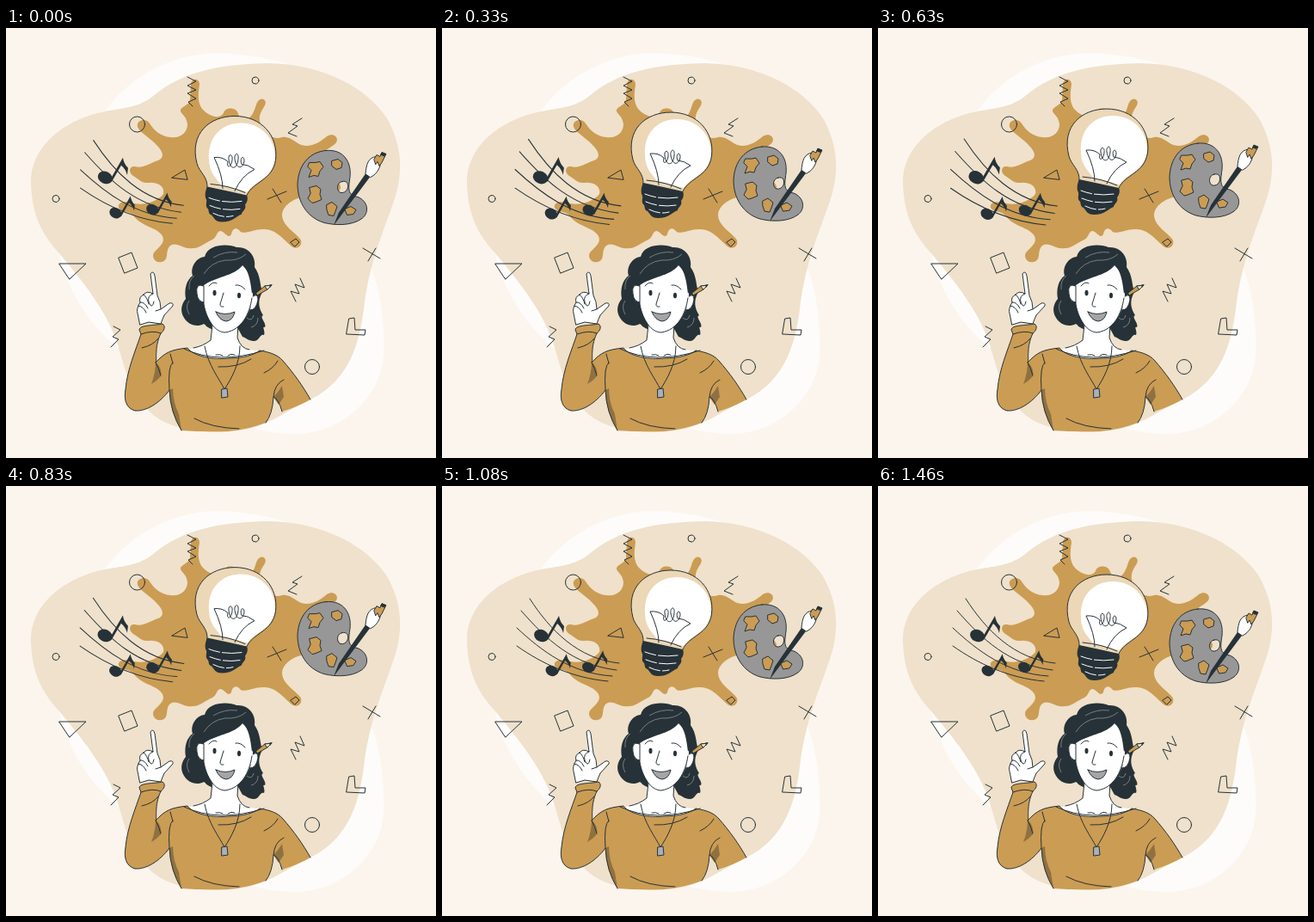
An HTML page that plays this animation: 500x500 px, repeating every 1500 ms.

```html
<!DOCTYPE html>
<html lang="en">
<head>
<meta charset="utf-8">
<title>Creative idea</title>
<style>
  html, body { margin: 0; width: 100%; height: 100%; overflow: hidden; background: #fcf5ed; }
  svg { display: block; width: 100%; height: 100%; }
  .line { fill: none; stroke: #263238; stroke-width: 1; stroke-linecap: round; stroke-linejoin: round; }
  .edge { stroke: #263238; stroke-width: 1; stroke-linejoin: round; stroke-linecap: round; }
  .gold { fill: #cb9c53; }
  .dark { fill: #263238; }
  .white { fill: #fff; }
  .cream { fill: #efe1cb; }
  .shade { fill: #8f7141; }
  .glint { fill: none; stroke: #9aa0a0; stroke-width: .7; }
</style>
</head>
<body>
<svg viewBox="0 0 500 500">
  <g id="backdrop">
    <path fill="#fdfcfa" d="M115 97C140 60 190 30 245 29C290 30 330 40 370 58L425 280C437 310 440 350 439 380C436 430 390 472 335 472C310 471 295 468 280 463L130 372C95 345 70 300 62 262Z"/>
    <path class="cream" d="M29 180C28 140 65 107 115 97C145 92 155 91 170 80C205 50 250 42 305 41C370 42 420 70 443 105C460 135 462 165 453 195C440 235 425 265 417 318C412 366 400 409 354 432C315 450 300 470 245 470C205 469 180 460 165 444C145 425 138 395 132 375C120 330 85 290 62 262C40 238 30 215 29 180Z"/>
  </g>

  <path class="gold" d="M215 65C216 58 225 58 225 66C223 78 223 87 228 94C237 104 249 106 253 99C254 92 268 91 270 100C273 107 282 108 286 101C291 93 290 88 294 84C298 80 304 84 301 90C296 98 292 104 297 114C302 126 313 130 321 127C332 125 338 137 349 137C359 137 367 131 373 126C382 120 390 130 381 136C373 142 362 146 365 159C369 171 386 175 389 184C390 194 372 196 357 195C338 195 322 205 321 217C321 231 339 239 343 247C345 254 337 259 331 253C320 243 312 233 299 234C286 234 275 242 271 235C267 231 263 234 262 240C258 246 254 236 249 236C244 237 246 244 238 247C229 251 224 258 211 256C202 254 196 248 190 254C185 260 190 270 181 272C173 274 168 265 173 260C180 253 185 249 182 242C177 232 157 231 148 218C143 212 134 215 131 209C129 201 142 201 149 204C162 207 177 201 183 193C185 184 176 179 166 180C157 181 154 175 148 172C142 168 143 160 150 161C159 164 169 156 177 154C186 150 181 142 175 136C168 128 155 121 153 115C151 107 163 104 167 111C173 120 180 126 191 127C203 129 211 121 211 112C210 103 205 101 203 97C202 91 213 91 214 83Z"/>

  <g id="doodles" class="line">
    <circle cx="290" cy="61" r="4"/><circle cx="152.500" cy="112" r="9"/>
    <circle cx="58" cy="198.500" r="4"/><circle cx="356" cy="394" r="8.500"/>
    <path d="M211 57L221 62L211 67L221 72L211 76L221 82L212 86L217 91M344 105L333 112L339 114L328 122L338 126M193 174L208 165L211 176ZM304 199L326 190M310 187L320 203M415 256L435 268M430 256L421 271M62 274H93L74 292ZM131 267L146 261L153 279L138 285ZM342 291L347 302L336 298L341 309L331 306L337 318M125 347L133 351L124 359L131 362L122 371M399 338L405 337L406 351L418 351L417 357L396 356ZM331 249L337 245L341 249L336 254Z"/>
  </g>

  <g id="music">
    <path class="line" d="M102 131C126 168 158 201 206 206M92 145C121 178 152 208 203 214M87 165C116 192 150 218 198 221M87 186C117 207 151 223 193 227"/>
    <g id="note" class="dark">
      <ellipse cx="115.500" cy="174" rx="8.700" ry="7" transform="rotate(25 115.500 174)"/>
      <path d="M121 177L136 151Q137 158 142 163L141 171Q139 164 134 160L123 179Z"/>
    </g>
    <use href="#note" transform="translate(30.500 67) scale(.84 .85)"/>
    <use href="#note" transform="translate(73 63) scale(.84 .85)"/>
  </g>

  <g class="float">
    <path fill="#ecd7b7" d="M222 158C213 123 237 103 266 103C297 103 317 126 313.500 154C310 178 287 179 280 195L257 196L234 188C235 173 225 169 222 158Z"/>
    <path class="white" d="M236 154C234 126 252 111 273 111C296 111 313 128 313 152C310 177 288 178 281 191C270 188 262 186 250 183C244 174 237 170 236 154Z"/>
    <path class="line" d="M234 187C235 173 225 169 222 158C213 123 237 103 266 103C297 103 317 126 313.500 154C310 178 287 179 280 195M252 187Q252 172 242 151Q252 150 258 156C256 164 262 163 263 154C264 146 258 147 259 153C260 166 269 166 270 153C271 144 265 146 266 153C268 166 276 164 277 155C277 148 271 151 274 159Q281 159 289 165Q274 172 266 190M238 182Q260 184 278 192"/>
    <path class="dark" d="M234 185Q258 190 280 195C282 199 280 204 278 206C280 211 274 214 274 217C268 219 264 226 251 226C243 226 242 221 239 218C234 216 237 212 234 210C231 206 235 202 232 198C231 194 232 189 234 185Z"/>
    <path class="line" style="stroke:#fff" d="M236 198Q254 205 274 202M237 207Q254 214 272 211M241 216Q253 222 264 219" stroke-dasharray="13 3 30 2"/>
  </g>

  <g class="float">
    <path fill="#979797" fill-rule="evenodd" class="edge" d="M372 143C393 141 402 157 400 174C398 188 397 195 409 197C421 202 423 215 414 222C402 231 382 230 370 227C350 221 339 203 339 182C340 160 352 145 372 143ZM391 179C384 180 384 190 389 192C396 193 399 186 397 181Q395 178 391 179Z"/>
    <path class="gold edge" d="M353 157L360 157L365 156L369 162L365 167L363 173L358 172L352 174L355 166L351 162ZM379 155L386 153L391 157L390 163L384 165L379 161ZM353 186L361 184L366 188L365 194L367 200L360 203L356 204L351 199L354 193ZM373 206L379 203L385 208L383 214L381 219L375 218L373 212ZM394 211L401 208L407 212L404 217L397 218Z"/>
    <path class="dark" d="M381 230L387 215L418 170L423 174L393 214Z"/>
    <path class="white edge" d="M418 170C419 159 421 151 431 150L436 157C434 166 430 171 424 174Z"/>
    <path class="gold edge" d="M428 153L431 148L435 150L437 145L442 147L437 157L434 161L432 156L430 159Z"/>
    <path class="dark" d="M435 148L437 145L442 147L440 150Z"/>
  </g>

  <g id="woman">
    <path class="dark" d="M231 266C235 250 260 251 268 255C283 254 291 267 289 278C296 288 295 297 298 307C292 318 294 326 299 334C294 336 304 344 301 348C297 346 302 353 300 357C295 355 295 364 288 364C282 364 279 360 275 359L270 350H239C233 348 232 345 230 344C221 349 211 344 207 337C202 329 204 321 209 315C207 303 210 293 217 288C214 278 221 267 231 266Z"/>
    <path class="white" d="M240 341L238 363Q225 373 205 374Q249 398 295 375Q273 376 269 360L270 340Z"/>
    <path class="line" d="M240 345L238 363Q229 370 218 372M270 346L269 360Q273 373 283 374M244 380Q249 379 252 381M258 381Q262 378 266 380"/>
    <path class="gold" d="M155 351C155 345 173 346 182 344C186 347 184 352 180 355C172 372 176 386 174 389C185 377 192 374 211 372C218 382 243 386 258 384C275 384 289 380 295 375C307 377 316 380 322 387C335 402 345 416 354 432Q338 441 321 446Q317 431 311 429Q310 449 302 459C286 465 275 467 258 469Q229 470 204 468Q191 447 190 421C179 436 163 446 150 445C139 442 137 431 139 420C141 397 151 374 157 356Z"/>
    <path class="shade" d="M174 388Q182 396 180 405Q175 411 169 414Q174 401 174 388ZM190 421L194 419Q194 435 201 449L204 468Q190 445 190 421ZM311 429Q317 423 321 416L323 429L317 438Z"/>
    <path class="line" d="M204 468Q191 447 190 421C179 436 163 446 150 445C139 442 137 431 139 420C141 397 151 374 157 356L155 351C155 345 173 346 182 344C186 347 184 352 180 355C172 372 176 386 174 389C185 377 192 374 211 372C218 382 243 386 258 384C275 384 289 380 295 375C307 377 316 380 322 387C335 402 345 416 354 432M302 459Q310 449 311 429Q317 431 321 446"/>
    <path class="line" d="M157 356Q171 351 180 355M158 372Q171 369 177 361M174 389Q178 396 180 404M190 421Q188 393 194 389M194 390L191 379M207 373Q247 392 300 375M247 394Q269 395 285 385M300 401Q311 396 316 387M311 429Q312 414 323 409M219 454Q239 465 271 466"/>
    <path class="line" d="M231 370C235 392 248 408 254 420C262 408 272 390 272 370"/>
    <path class="edge" fill="#aab0ba" d="M251 420L257 419L258 429L251 430Z"/>

    <path class="white edge" d="M156 345L166 342L180 344Q182 338 184 334L194 323Q195 319 190 320L180 327Q180 318 176 311L173 288Q171 281 168 286L171 309Q164 305 160 310Q154 313 156 319Q151 327 153 332Z"/>
    <path class="line" d="M160 310Q164 313 166 321M156 319Q161 318 165 326M154 323Q160 324 163 331M171 309Q164 311 166 319Q170 328 172 318M180 327L174 329"/>

    <path class="white edge" d="M230 300Q220 296 222 309Q223 319 231 319M286 313Q293 307 293 316Q291 328 284 328"/>
    <path class="white" d="M230 300C230 286 239 293 251 285C262 278 269 270 276 272C284 281 286 293 287 309C287 326 275 352 255 354C243 354 233 337 230 321Z"/>
    <path class="line" d="M230 300V321C233 339 243 354 255 354C274 351 283 333 286 314"/>
    <path class="dark" d="M229 300C223 283 233 270 252 266C266 258 282 266 286 277C290 286 291 302 286 309C284 292 282 282 275 276C265 289 243 289 229 300Z"/>
    <path class="glint" d="M230 286Q239 272 255 270Q270 271 279 263M213 304Q212 293 219 288M213 333Q208 324 213 317M241 267Q254 259 269 261M285 348Q293 346 293 337M280 337Q286 342 288 334"/>
    <ellipse class="dark" cx="242.500" cy="308" rx="2" ry="3.300"/>
    <ellipse class="dark" cx="271" cy="311" rx="2" ry="3.300"/>
    <path class="line" d="M236 300Q241 294 245 297M267 299Q273 298 278 304M253 308L249 321Q249 325 253 324"/>
    <path class="edge" fill="#a5a5a5" d="M244 330Q255 335 266 330Q264 340 256 341Q248 340 244 330Z"/>
    <path class="gold edge" d="M291 308L301 300L309 299L304 304L292 311Z"/>
    <path class="cream edge" d="M301 300L309 299L304 304Z"/>
    <path class="dark" d="M306 299L310 298L307 302Z"/>
  </g>
</svg>
<script>
  const LOOP = 1500, LEAD = 40, RISE = 10;
  const beat = [[0, 1.007], [180, 1.1], [350, 1.025], [560, 1.1], [640, 1.035], [830, 1.015], [1030, 1], [LOOP, 1]];
  const music = document.getElementById('music');
  const floaters = document.querySelectorAll('.float');

  function scaleAt(t) {
    const i = beat.findIndex(([time]) => time > t);
    const [t0, s0] = beat[i - 1], [t1, s1] = beat[i];
    return s0 + (s1 - s0) * (t - t0) / (t1 - t0);
  }

  function draw(now) {
    const t = now % LOOP;
    const phase = (t + LEAD) % LOOP / LOOP;
    const y = -RISE * (1 - Math.abs(1 - 2 * phase));
    floaters.forEach(el => el.setAttribute('transform', `translate(0 ${y})`));
    music.setAttribute('transform', `translate(146.500 180) scale(${scaleAt(t)}) translate(-146.500 -180)`);
    requestAnimationFrame(draw);
  }
  draw(performance.now());
</script>
</body>
</html>
```
